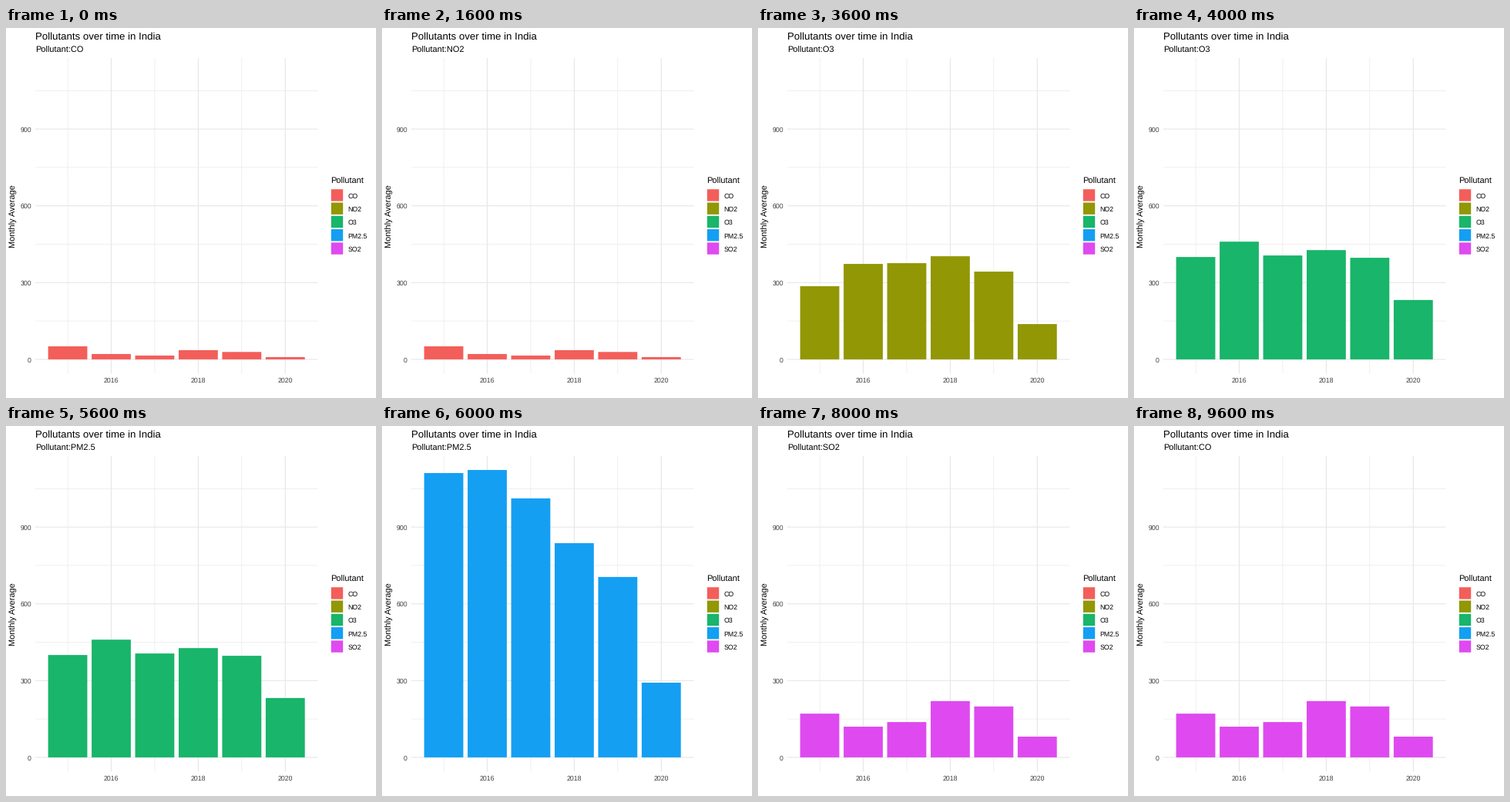
Recreate the animation shown at these times as a matplotlib script. Size 480 by 480 pixels, loop 10 s.

```python
import matplotlib.pyplot as plt
from matplotlib.animation import FuncAnimation
from matplotlib.patches import Rectangle

plt.rcParams["font.family"] = "Liberation Sans"
plt.rcParams["text.hinting"] = "none"

STEP = 400      # ms per frame
HOLD = 5        # frames per pollutant
COUNT = 25

# name: (colour, yearly values 2015..2020)
DATA = {
    "CO": ("#F35E5A", [51, 21, 15, 36, 29, 9]),
    "NO2": ("#929705", [286, 373, 376, 403, 343, 138]),
    "O3": ("#18B56A", [400, 460, 406, 427, 397, 232]),
    "PM2.5": ("#149FF3", [1111, 1123, 1012, 837, 705, 292]),
    "SO2": ("#DE4AF0", [171, 120, 138, 220, 199, 81]),
}
NAMES = list(DATA)

LEFT, RIGHT, TOP, BOTTOM = 38, 404.5, 38.9, 448.4
BASE, UNIT = 429.9, 0.332
YEAR_W = 56.45
BAR_W = 0.9 * YEAR_W
GRID, TICK = "#E6E6E6", "#404040"

fig = plt.figure(figsize=(480 / 72, 480 / 72), dpi=72, facecolor="white")
ax = fig.add_axes([0, 0, 1, 1])
ax.set_xlim(0, 480)
ax.set_ylim(480, 0)
ax.axis("off")


def year_x(year):
    return 80.06 + YEAR_W * (year - 2015)


def value_y(value):
    return BASE - UNIT * value


def line(xs, ys, width):
    ax.plot(xs, ys, color=GRID, lw=width, solid_capstyle="butt",
            snap=False, zorder=1)


def label(x, y, text, size, color="black", **kw):
    return ax.text(x, y, text, fontsize=size, color=color,
                   va="baseline", **kw)


def box(x, y, w, h, color):
    return ax.add_patch(Rectangle((x, y), w, h, facecolor=color, lw=0,
                                  snap=False, zorder=2))


# Grid and tick labels
for value in range(0, 1051, 150):
    major = value % 300 == 0
    y = value_y(value)
    line([LEFT, RIGHT], [y, y], 1.07 if major else 0.6)
    if major:
        label(33, y + 3.6, str(value), 8.8, TICK, ha="right")

for year in range(2015, 2021):
    major = year % 2 == 0
    x = year_x(year)
    line([x, x], [TOP, BOTTOM], 1.07 if major else 0.6)
    if major:
        label(x, 460, str(year), 8.8, TICK, ha="center")

# Titles
label(38, 15, "Pollutants over time in India", 13.2)
subtitle = label(38, 32, "", 11)
ax.text(13, 243.7, "Monthly Average", fontsize=11, rotation=90,
        rotation_mode="anchor", ha="center", va="baseline")

# Legend
label(420.8, 202, "Pollutant", 11)
for i, name in enumerate(NAMES):
    y = 217 + 17.28 * i
    box(421.8, y - 7.8, 15.4, 15.4, DATA[name][0])
    label(443.5, y + 3.8, name, 8.8)

bars = [box(year_x(y) - BAR_W / 2, BASE, BAR_W, 0, "white")
        for y in range(2015, 2021)]


def draw(k):
    color, values = DATA[NAMES[k // HOLD]]
    for bar, value in zip(bars, values):
        bar.set_y(value_y(value))
        bar.set_height(UNIT * value)
        bar.set_facecolor(color)
    # The subtitle switches one frame ahead of the bars
    subtitle.set_text("Pollutant:" + NAMES[(k + 1) // HOLD % len(NAMES)])
    return bars + [subtitle]


anim = FuncAnimation(fig, draw, frames=COUNT, interval=STEP,
                     repeat=True, repeat_delay=0)
plt.show()
```
